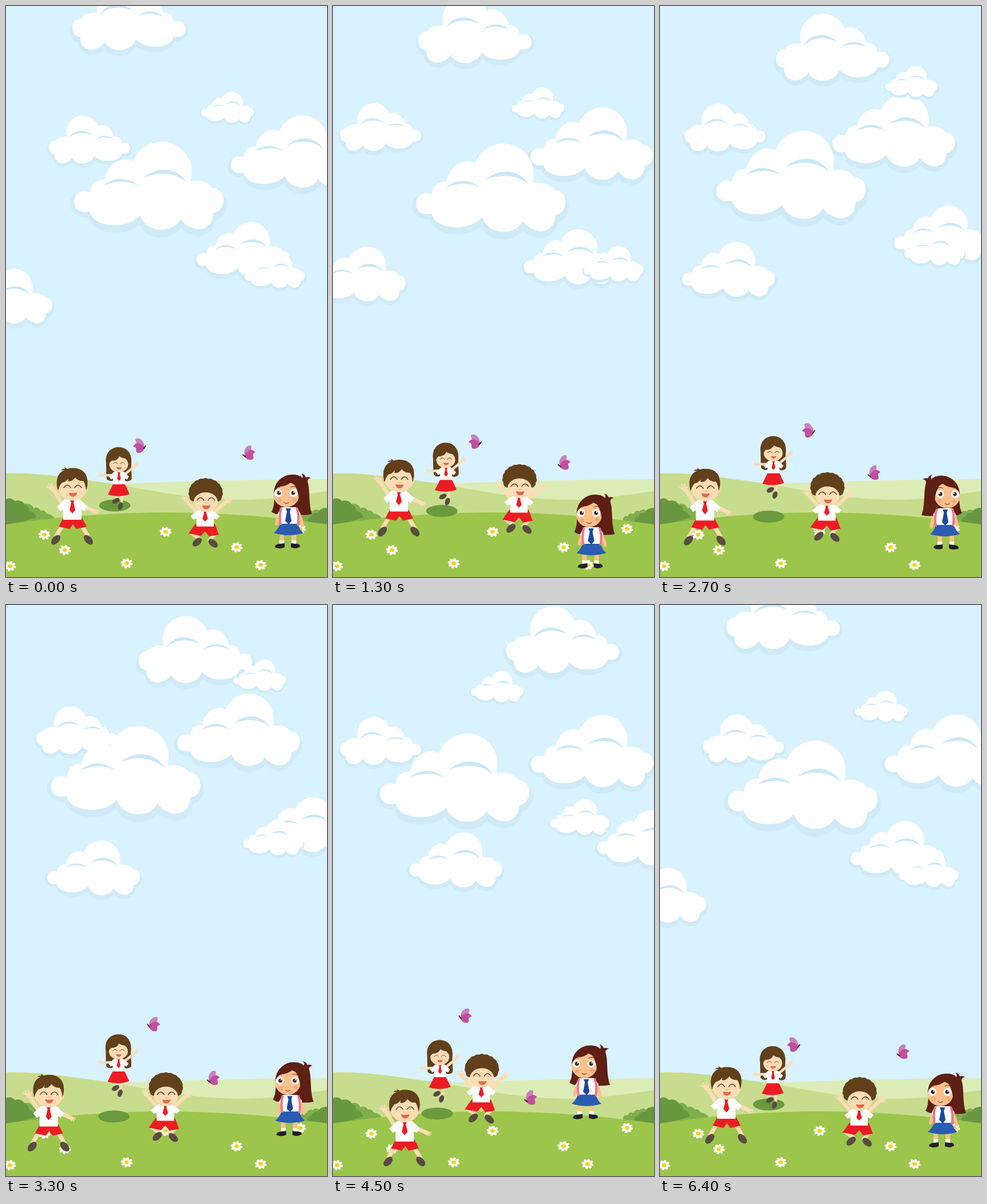
These frames come from a looping animation (561x998 px, 6.5 s). An HTML page:

```html
<!DOCTYPE html>
<html lang="en">
<head>
<meta charset="utf-8">
<title>Children in a meadow</title>
<style>
  html, body { margin: 0; width: 100%; height: 100%; overflow: hidden; background: #d9f2ff; }
  svg { display: block; width: 100vw; height: 100vh; }
  .skin { fill: #fbdcb4; }
  .limb { fill: none; stroke: #fbdcb4; stroke-linecap: round; }
  .hair { fill: #61401a; }
  .red { fill: #ed1c24; }
  .white { fill: #fff; }
  .line { fill: none; stroke: #5b3a1c; stroke-linecap: round; }
  .maroon { fill: #5e1f15; }
  .tan { fill: #f9c08d; }
  .blue { fill: #2a5cb3; }
  .dark { fill: #699740; }
  .mid { fill: #7fae4b; }
</style>
</head>
<body>
<svg viewBox="0 0 561 998" preserveAspectRatio="none">
  <defs>
    <g id="cloud">
      <path fill="#d0ebf7" d="M14 90C-2 88-7 98-7 108C-6 124 8 132 24 132C32 152 54 159 76 158C92 157 104 152 114 144C122 160 136 167 153 167C168 167 180 160 187 150C196 160 208 165 220 164C236 162 246 150 248 136C262 132 267 118 267 106C267 98 260 90 252 88Z"/>
      <path fill="#fff" d="M28 88C10 82 0 92 0 104C0 120 14 125 27 121C32 140 54 146 76 145C94 144 108 136 115 128C121 144 136 153 153 153C168 153 182 145 186 134C194 146 208 152 219 152C234 151 243 140 243 124C256 122 261 112 261 100C261 88 251 80 241 80C236 71 222 65 203 68A53 53 0 0 0 103 33C80 22 56 42 53 66C38 64 28 74 28 88Z"/>
      <path fill="#cbe8f6" d="M52 76C68 60 94 60 112 76C94 67 74 67 52 76ZM121 62C147 40 182 44 198 72C178 53 150 51 121 62Z"/>
    </g>
    <g id="daisy"></g>
    <g id="smile">
      <path class="line" stroke-width="1.4" d="M-15 2Q-9 -7 -3 2M4 2Q10 -7 16 2"/>
      <path fill="none" stroke="#eebb8c" stroke-width="1.4" d="M-1 6Q1 8 3 6"/>
      <path fill="#e2694a" d="M-6 10.5Q1 12 8 10.5C8 20 -6 20 -6 10.5Z"/>
    </g>
    <g id="hand">
      <ellipse class="skin" rx="4" ry="4.5"/>
      <path class="limb" stroke-width="2.2" d="M-2 -2L-4.5 -8M0 -3L0 -9.5M2 -2L4.5 -7.5M3 1L6.5 -2"/>
    </g>
    <g id="torso">
      <path class="white" d="M-13 0H13L27 13L21 21L16 18V36H-16V18L-21 21L-27 13Z"/>
      <path class="red" d="M-4 1H4L2 6L5 19L0 25L-5 19L-2 6Z"/>
    </g>
    <ellipse id="shoe" rx="10" ry="6" fill="#5a4b43"/>
    <g id="fly">
      <path fill="#cb80bd" d="M8 0C5 -13 -5 -15 -9 -11C-8 -3 0 3 8 0Z"/>
      <path fill="#c14e9f" d="M8 1C0 -6 -8 -7 -12 2Q-8 2 -6 5Q-7 9 -4 12C3 13 8 8 8 1Z"/>
      <path fill="none" stroke="#3b2634" stroke-width="2" stroke-linecap="round" d="M7 4L10 -1"/>
    </g>
  </defs>

  <path fill="#dcecb7" d="M130 840C200 833 380 828 561 827V920H100Z"/>
  <path fill="#c7dd8d" d="M0 817C55 815 105 824 180 834C260 847 320 863 420 863C475 862 520 853 561 848V930H0Z"/>
  <path class="mid" d="M28 872Q43 866 48 878Q56 874 61 882Q67 880 71 887Q80 888 85 895L20 910Z"/>
  <path class="dark" d="M0 862Q9 858 15 865Q28 862 33 872Q41 874 40 882Q50 884 53 894L0 910Z"/>
  <path class="mid" d="M507 897Q508 890 515 892Q518 885 525 888Q529 880 536 883Q540 878 546 881L561 910H510Z"/>
  <path class="dark" d="M527 902Q526 892 534 893Q536 884 545 886Q548 877 561 877V910Z"/>
  <path fill="#9cc54b" d="M0 906C90 892 190 885 280 885C390 886 480 894 561 906V998H0Z"/>
  <g id="flowers"></g>
  <g id="clouds"></g>

  <ellipse id="shade" rx="27.5" ry="10.5" fill="#6b9a3e"/>

  <g id="lass">
    <path class="hair" d="M175 800C172 781 184 771 197 771C211 771 221 782 219 800C218 812 221 822 219 828Q211 834 205 827L204 818H190L189 828Q182 833 176 827Q175 816 175 800Z"/>
    <path class="limb" stroke-width="4.5" d="M195 852L192 861M203 852L202 870M187 820L168 820.5M207 819L224 805"/>
    <use href="#shoe" transform="translate(192 865) rotate(-28) scale(.7)"/>
    <use href="#shoe" transform="translate(200 874) rotate(-70) scale(.68)"/>
    <use href="#hand" transform="translate(167 820) rotate(-85) scale(.58)"/>
    <use href="#hand" transform="translate(226 802) rotate(45) scale(.68)"/>
    <use href="#torso" transform="translate(197.5 814) scale(.65)"/>
    <path class="red" d="M187 836H208L216 853Q197 860 178 854Z"/>
    <ellipse class="skin" cx="197" cy="801" rx="16.5" ry="14"/>
    <path class="hair" d="M178 803C176 784 187 775 198 775C211 775 219 787 216 803Q214 796 212 791Q203 791 198 787Q195 795 184 795Q181 798 178 803Z"/>
    <use href="#smile" transform="translate(197 799) scale(.65)"/>
  </g>

  <g id="curly">
    <path class="limb" stroke-width="6.5" d="M334 886L317 866M363 886L383 868M324 921L338 931M367 921L356 933"/>
    <use href="#hand" transform="translate(314 863) rotate(-35) scale(.95)"/>
    <use href="#hand" transform="translate(387 865) rotate(45) scale(.95)"/>
    <use href="#shoe" transform="translate(334 937) rotate(-42) scale(.96)"/>
    <use href="#shoe" transform="translate(362 939) rotate(42) scale(.96)"/>
    <path class="red" d="M331 905H365L372 924L355 927L348 918L341 926L319 922Z"/>
    <use href="#torso" transform="translate(348 881) scale(.95 .8)"/>
    <g class="hair" id="curls"><ellipse cx="349" cy="850" rx="25" ry="18"/></g>
    <ellipse class="skin" cx="349" cy="867" rx="21" ry="17"/>
    <use href="#smile" transform="translate(349 862)"/>
  </g>

  <g id="boy">
    <path class="limb" stroke-width="7" d="M99 871L84 847M137 875L155 883M98 909L88 926M133 909L143 926"/>
    <use href="#hand" transform="translate(81 844) rotate(-35) scale(1.08)"/>
    <use href="#hand" transform="translate(156 883) rotate(112) scale(.72)"/>
    <use href="#shoe" transform="translate(87 933) rotate(-48)"/>
    <use href="#shoe" transform="translate(144 933) rotate(48)"/>
    <path class="red" d="M100 895H133L141 910L123 914L117 906L111 914L92 910Z"/>
    <use href="#torso" transform="translate(116 862)"/>
    <ellipse class="skin" cx="116.5" cy="846" rx="27" ry="4"/>
    <ellipse class="skin" cx="116.5" cy="843" rx="24.5" ry="21.5"/>
    <path class="hair" d="M91 847C85 828 92 814 103 811Q97 811 96 812Q98 808 103 809L102 806L107 809C121 805 137 809 141 823C144 833 142 840 140 847Q139 836 135 830Q126 831 121 824Q114 833 108 830L109 826Q103 833 98 833Q93 838 91 847Z"/>
    <use href="#smile" transform="translate(116 840)"/>
  </g>

  <g id="pupil"><g transform="translate(-499 0)">
    <path class="maroon" d="M470 850C471 830 485 818 502 819Q512 819 518 825Q520 821 516 817Q523 819 524 824Q528 822 533 825Q527 826 527 831C532 846 528 870 535 888Q520 891 506 888H478Q470 889 464 884C470 874 468 862 470 850Z"/>
    <path class="tan" d="M478 920h8v16h-8ZM499 920h8v16h-8Z"/>
    <path class="white" d="M478 934h8v7h-8ZM499 934h8v7h-8Z"/>
    <path fill="#20202a" d="M487 939V946Q478 950 470 946Q470 941 478 940ZM498 939V946Q506 950 514 945Q514 940 507 940Z"/>
    <path fill="none" stroke="#f9c08d" stroke-width="6" stroke-linecap="round" d="M480 887Q475 894 473 905M510 887Q516 895 518 908"/>
    <path class="white" d="M481 876H507L515 887L510 893V908H479V894L474 889Z"/>
    <path class="blue" d="M479 905H510Q513 916 520 921Q494 929 468 921Q476 914 479 905Z"/>
    <path fill="none" stroke="#f2748c" stroke-width="4" d="M481 877Q477 890 480 907M508 877Q513 890 510 908"/>
    <path fill="#1c479b" d="M489 878H498L496 884L499 900L494 906L488 900L491 884Z"/>
    <ellipse class="tan" cx="490" cy="854" rx="22.5" ry="22"/>
    <path class="maroon" d="M468 852C469 829 485 820 500 820C519 823 519 850 512 869Q513 846 500 831Q490 840 477 840Q471 845 468 852Z"/>
    <path fill="none" stroke="#f6a67d" stroke-width="7" stroke-linecap="round" d="M478 864h0M504 863h0"/>
    <g fill="none" stroke-linecap="round">
      <path stroke="#fff" stroke-width="14" d="M476 851h0M502.500 851h0"/>
      <path stroke="#4c2114" stroke-width="7" d="M477 851h0M502 851h0"/>
      <path stroke="#fff" stroke-width="2.400" d="M478.500 849.500h0M503.500 849.500h0"/>
      <path stroke="#5a2015" d="M471 842Q475 839 479 841M498 841Q503 838 507 841M509 846L512 843M510 849L513 848M486 868Q490 871 494 868"/>
    </g>
  </g></g>

  <use id="fly1" href="#fly"/>
  <use id="fly2" href="#fly"/>
</svg>
<script>
const $ = id => document.getElementById(id);
const TICK = 100, TICKS = 65;
const OUT = 1, TURN = 47, HOME = 64;

function add(parent, tag, attrs) {
  const el = document.createElementNS('http://www.w3.org/2000/svg', tag);
  for (const name in attrs) el.setAttribute(name, attrs[name]);
  return parent.appendChild(el);
}

// Evenly paced smooth curve through the stops, then a straight line home.
function route(stops) {
  const last = stops.length - 1;
  const tangent = (i, d) => {
    const a = Math.max(0, i - 1), b = Math.min(last, i + 1);
    return (stops[b][d] - stops[a][d]) / (b - a);
  };
  return k => {
    if (k >= TURN) {
      const u = (k - TURN) / (HOME - TURN);
      return stops[last].map((p, d) => p + (stops[0][d] - p) * u);
    }
    const s = (k - OUT) / (TURN - OUT) * last;
    const i = Math.floor(s), u = s - i, w = 1 - u;
    return stops[i].map((p, d) =>
      p * w * w * (1 + 2 * u) + stops[i + 1][d] * u * u * (3 - 2 * u) +
      u * w * (tangent(i, d) * w - tangent(i + 1, d) * u));
  };
}

const actors = [];
function move(el, pose, ...stops) {
  const at = route(stops);
  actors.push(k => {
    const [x, y] = at(k);
    const right = at(k < HOME ? k + 1 : OUT + 1)[0] > x;
    el.setAttribute('transform', `translate(${x} ${y}) ${pose(right)}`);
  });
}
const still = () => '';
const faceLeft = right => `scale(${right ? -1 : 1} 1)`;
const faceRight = tilt => right => `scale(${right ? 1 : -1} 1) rotate(${tilt})`;

function cloud(width, mirrored, ...stops) {
  const s = width / 261;
  const pose = mirrored ? `translate(${width}) scale(${-s} ${s})` : `scale(${s})`;
  move(add($('clouds'), 'use', { href: '#cloud' }), () => pose, ...stops);
}

for (let a = 0; a < 360; a += 45)
  add($('daisy'), 'ellipse', { cx: 6, rx: 4.6, ry: 2.7, fill: '#fff', transform: `rotate(${a})` });
add($('daisy'), 'circle', { r: 4, fill: '#f5d020' });

for (const [x, y] of [[67, 924], [103, 951], [279, 919], [403, 946],
  [445, 977], [211, 974], [7, 979], [514, 914]])
  add($('flowers'), 'use', { href: '#daisy', transform: `translate(${x} ${y}) scale(1 .85) rotate(12)` });

for (let i = 0; i < 13; i++) {
  const a = Math.PI * (.87 + i * 1.26 / 12);
  add($('curls'), 'circle', { cx: 349 + 22.5 * Math.cos(a), cy: 851 + 18.5 * Math.sin(a), r: 7.6 });
}

cloud(142, true, [75, 192], [5, 167], [54, 176], [5, 199]);
cloud(214, false, [393, 192], [334, 174], [298, 154], [354, 199]);
cloud(261, false, [119, 238], [145, 240], [81, 213], [83, 228]);
cloud(198, true, [116, -39], [160, -10], [225, 20], [314, 0]);
cloud(92, false, [341, 150], [314, 138], [404, 96], [214, 119]);
cloud(163, false, [333, 378], [341, 389], [436, 337], [465, 363]);
cloud(105, false, [417, 431], [440, 415], [417, 379], [373, 334]);
cloud(162, false, [-81, 460], [-20, 414], [65, 413], [144, 396]);

move($('shade'), still, [190, 873], [190, 885], [189, 894], [181, 888]);
move($('lass'), still, [0, 0], [0, -10], [0, -21], [-12, -9]);
move($('curly'), still, [0, 0], [-30, -27], [-67, -7], [-92, -46]);
move($('boy'), still, [0, 0], [-4, -15], [-43, 11], [18, 44]);
move($('pupil'), faceLeft, [499, 0], [453, 37], [503, -16], [439, -54]);
move($('fly1'), faceRight(5), [234, 769], [252, 759], [259, 735], [226, 716]);
move($('fly2'), faceRight(20), [424, 782], [397, 804], [364, 825], [342, 868]);

const start = performance.now();
let shown = -1;
function frame() {
  const tick = Math.floor((performance.now() - start) / TICK) % TICKS;
  const k = Math.max(OUT, tick);
  if (k !== shown) {
    shown = k;
    for (const step of actors) step(k);
  }
  requestAnimationFrame(frame);
}
frame();
</script>
</body>
</html>
```
